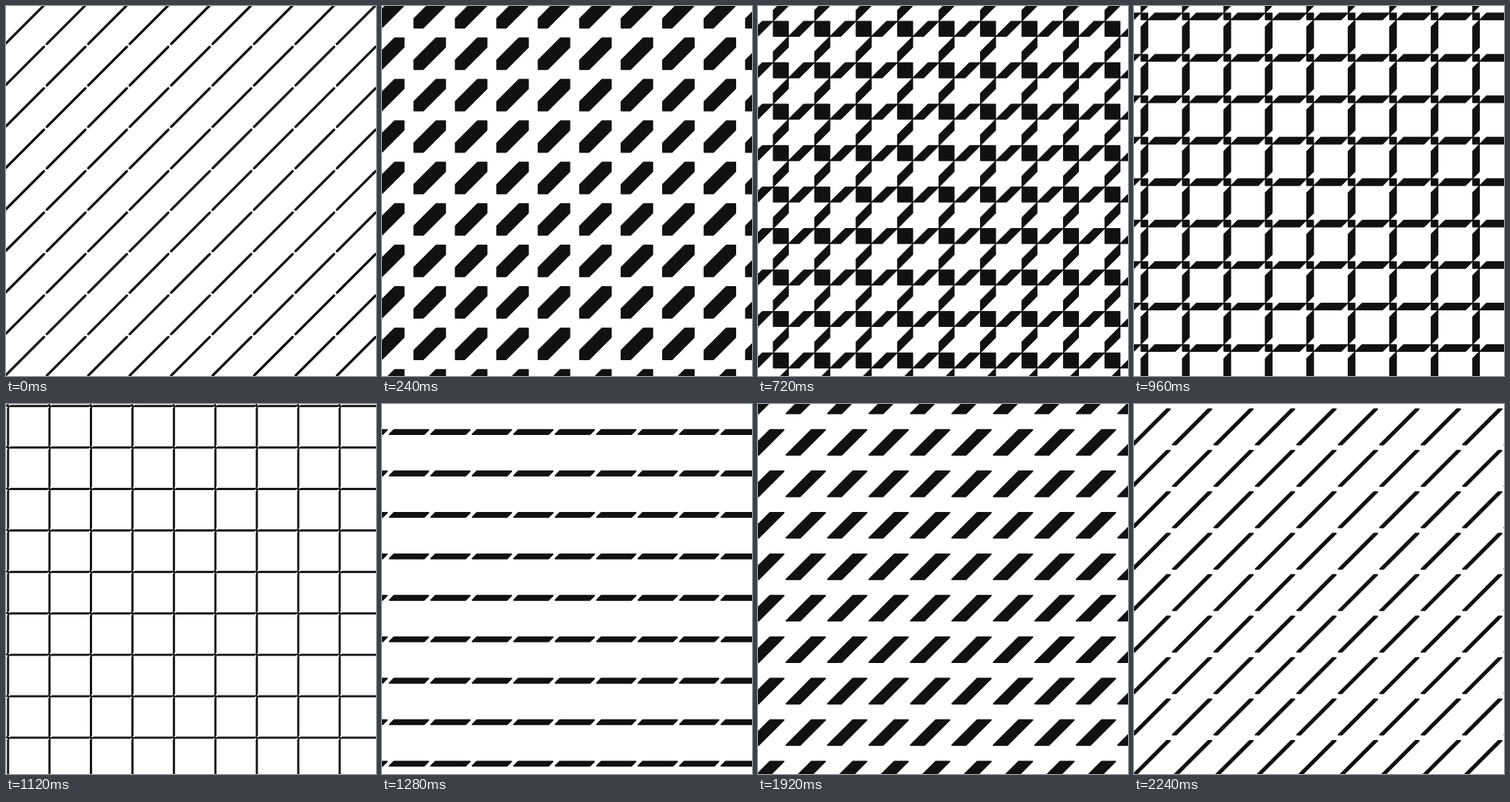
Write an HTML page with a canvas that moves like this. It is 490x490 px and loops after 2.32 s.

```html
<!DOCTYPE html>
<html lang="en">
<head>
<meta charset="utf-8">
<title>Shifting grid</title>
<style>
  html, body { margin: 0; width: 100%; height: 100%; overflow: hidden; background: #fff; }
  canvas { display: block; width: 490px; height: 490px; }
</style>
</head>
<body>
<canvas id="stage" width="490" height="490"></canvas>
<script>
const ctx = document.getElementById('stage').getContext('2d');
const SIZE = 490, CELL = 54.9, STEP = 80, STEPS = 29, SPLIT_STEPS = 15;

const flip = points => points.map(([x, y]) => [y, x]);

// Hexagon shrinking to a square, which then splits off two slanted bars.
function split(step) {
  const r = CELL * (14.5 - step) / 15, d = 2 * r;
  const e = Math.min(r, CELL - r);
  const core = [[d - e, r], [d, r], [d, r + e], [r + e, d], [r, d], [r, d - e]];
  if (r > CELL / 2) return [core];
  const bar = [[d, d], [CELL, d], [CELL + r, r], [3 * r, r]];
  return [core, bar, flip(bar)];
}

// Flat bar growing taller and narrower until it is a diagonal line.
function rise(step) {
  const h = (step - 14) * CELL / 16 - 1;
  const w = CELL * 15 / 16 - h, x = h + 4.2, y = 45.9 - h;
  return [[[x, y], [x + w, y], [x + w + h, y - h], [x + h, y - h]]];
}

function addShape(points, dx, dy) {
  points.forEach(([x, y], i) => {
    if (i) ctx.lineTo(x + dx, y + dy);
    else ctx.moveTo(x + dx, y + dy);
  });
  ctx.closePath();
}

function draw(step) {
  const splitting = step < SPLIT_STEPS;
  const shapes = splitting ? split(step) : rise(step);
  ctx.fillStyle = '#fff';
  ctx.fillRect(0, 0, SIZE, SIZE);
  ctx.fillStyle = ctx.strokeStyle = '#111';
  ctx.lineWidth = splitting ? 1 : 2;
  ctx.lineJoin = 'round';
  for (const points of shapes) {
    ctx.beginPath();
    for (let dy = -2 * CELL; dy < SIZE + 2 * CELL; dy += CELL)
      for (let dx = -2 * CELL; dx < SIZE + CELL; dx += CELL)
        addShape(points, dx, dy);
    ctx.fill();
    ctx.stroke();
  }
}

const start = performance.now();
let shown = -1;

function tick() {
  const step = Math.floor((performance.now() - start) / STEP) % STEPS;
  if (step !== shown) draw(shown = step);
  requestAnimationFrame(tick);
}
tick();
</script>
</body>
</html>
```
